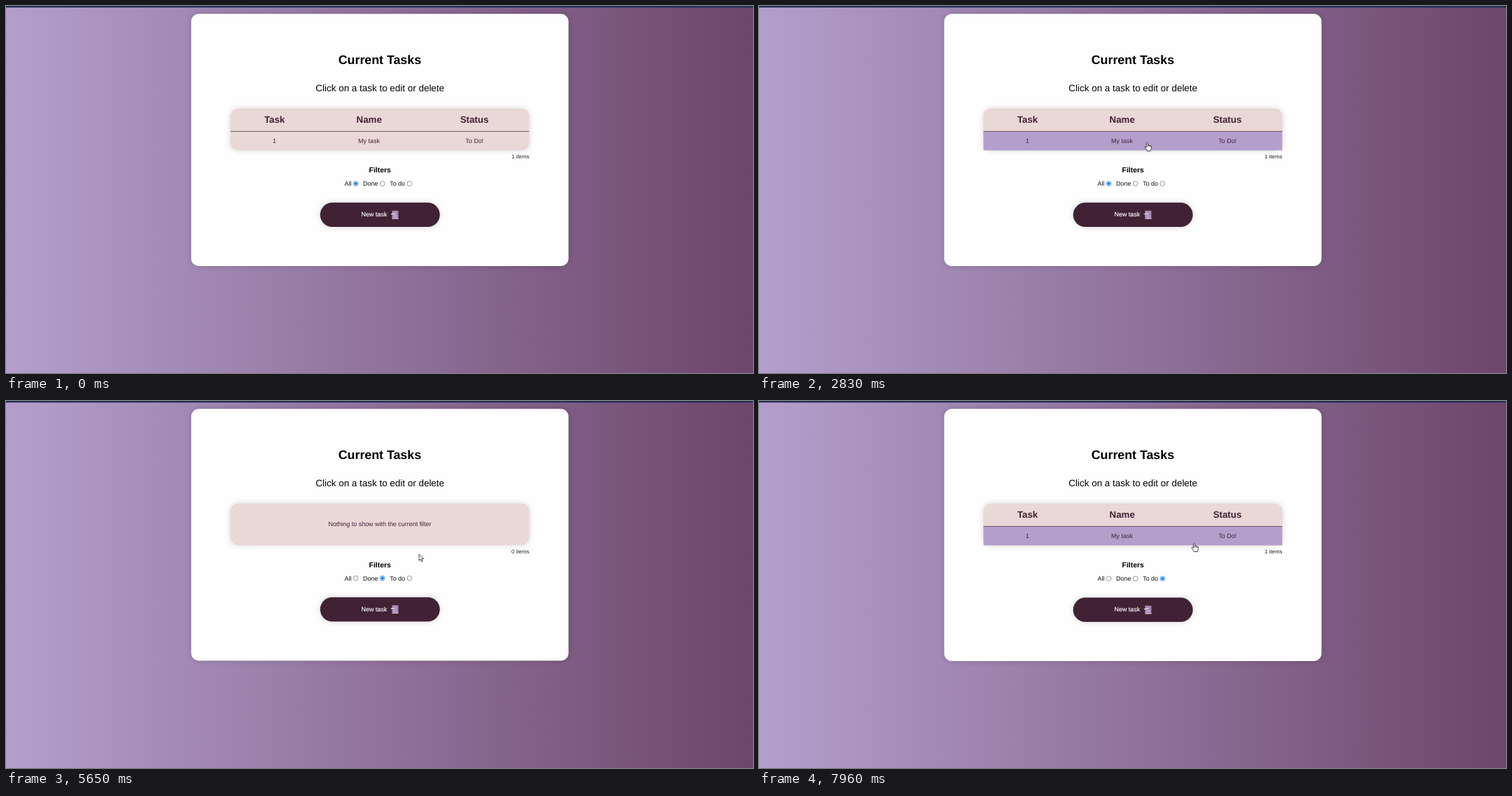
Animation of 1067 by 525 pixels, one loop 8 s. Source, as an HTML page:

```html
<!DOCTYPE html>
<html lang="en">
<head>
<meta charset="utf-8">
<title>Current Tasks</title>
<style>
  html, body { margin: 0; width: 100%; height: 100%; overflow: hidden; background: #6d466b; }
  svg { display: block; width: 1067px; height: 525px; }
  text {
    font: 8.95px "Liberation Sans", Arial, sans-serif; fill: #412234;
    text-anchor: middle; text-rendering: geometricPrecision;
  }
  .title { font-size: 17.8px; font-weight: bold; fill: #000; }
  .lead { font-size: 13.45px; fill: #000; }
  .head { font-size: 13.34px; font-weight: bold; }
  .count { font-size: 7.85px; text-anchor: end; fill: #222; }
  .filters { font-size: 10.4px; font-weight: bold; fill: #000; }
  .label { text-anchor: start; fill: #111; }
  .button { text-anchor: start; fill: #fff; stroke: #fff; stroke-width: .15; }
  .shadow { opacity: .16; filter: url(#blur); }
</style>
</head>
<body>
<svg viewBox="0 0 1067 525">
  <defs>
    <linearGradient id="page">
      <stop offset="0" stop-color="#b49fcc"/>
      <stop offset="1" stop-color="#6d466b"/>
    </linearGradient>
    <filter id="blur" x="-20%" y="-60%" width="140%" height="220%">
      <feGaussianBlur stdDeviation="4.5"/>
    </filter>
  </defs>
  <rect width="1067" height="525" fill="url(#page)"/>
  <rect width="1067" height="2.2" fill="#1f2d56"/>

  <rect class="card shadow" x="264.5" y="11.3" width="539" rx="11.1"/>
  <rect class="card" x="264.5" y="11.3" width="539" rx="11.1" fill="#fefefe"/>
  <text class="title" x="533.9" y="83.3">Current Tasks</text>
  <text class="lead" x="534.2" y="121.6">Click on a task to edit or delete</text>

  <rect class="table shadow" x="320.6" y="146.8" width="426.8" rx="11.1"/>
  <rect class="table" x="320.6" y="146.8" width="426.8" rx="11.1" fill="#ead7d7"/>
  <g id="tasks">
    <rect id="row" x="320.6" y="179.5" width="426.8" height="27" fill="#b49fcc"/>
    <path d="M320.6 179.4H747.4" stroke="#412234" stroke-width=".7"/>
    <text class="head" x="383.6" y="167.3">Task</text>
    <text class="head" x="518.7" y="167.3">Name</text>
    <text class="head" x="669" y="167.3">Status</text>
    <text x="383.4" y="195.8">1</text>
    <text x="518.5" y="195.8">My task</text>
    <text x="669.2" y="195.8">To Do!</text>
  </g>
  <text id="empty" x="534" y="179">Nothing to show with the current filter</text>

  <g id="lower">
    <text id="count" class="count" x="747.4" y="218.3"></text>
    <text class="filters" x="534.2" y="238.4">Filters</text>
    <text class="label" x="483.6" y="257.4">All</text>
    <text class="label" x="510" y="257.4">Done</text>
    <text class="label" x="548.2" y="257.4">To do</text>
    <g id="radios"></g>
    <rect class="shadow" x="448.7" y="281.3" width="171" height="34.8" rx="17.4"/>
    <rect x="448.7" y="281.3" width="171" height="34.8" rx="17.4" fill="#412234"/>
    <text class="button" x="507.5" y="301.4">New task</text>
    <rect x="551.4" y="292.8" width="9" height="12" fill="#a78bb8"/>
    <path d="M552 303.9H560.4M553 300.5H558.5" stroke="#d9cbe2" stroke-width=".9"/>
    <path d="M549.6 297.7L556.3 296.9" stroke="#f1e6ee" stroke-width="1.1"/>
  </g>

  <g id="cursor" stroke="#1c1722" stroke-width=".8" stroke-linejoin="round" fill="#fff">
    <path id="arrow" d="M.3 .3V9.3L2.4 7.4L3.8 10.8L5.4 10.1L4 6.8H6.8Z"/>
    <path id="hand" d="M-1 1Q0 -.6 1 1V4.4Q2 3.6 2.8 4.8Q3.8 4 4.4 5.2Q5.7 4.7 5.8 6.2V9Q5.6 10.6 4.8 11.4V12.6H-.3V11.4Q-1.7 9.9-3.3 7.6Q-3.6 6.2-2.3 6.3L-1 7.6ZM1 4.4V6.5M2.8 4.8V6.6M4.4 5.2V6.8"/>
  </g>
</svg>
<script>
const LOOP = 8000, FADE = 300, PICK_DONE = 3940, PICK_TODO = 6350;
const $ = id => document.getElementById(id);
const clamp = k => Math.min(1, Math.max(0, k));

// Pointer stops: arrival time, x, y and an optional pause in ms.
const stops = [
  [150, 1064, 518], [820, 858, 287], [1300, 835, 314.5, 190],
  [1760, 755, 172], [2000, 384, 152], [2330, 577.5, 187],
  [3050, 548, 197, 90], [3330, 517, 244], [3800, 537, 252, 400],
  [4590, 645.5, 233], [4720, 590, 187], [4950, 597, 204.5, 430],
  [6120, 573, 252, 500], [7420, 612.5, 188], [7960, 621.5, 203]
];

const radios = [499.6, 537.6, 576.4].map(x => {
  const g = document.createElementNS("http://www.w3.org/2000/svg", "g");
  g.innerHTML = `<circle cx="${x}" cy="254.1" r="3.4" fill="#fff" stroke-width=".75"/>
    <circle cx="${x}" cy="254.1" r="2.15" fill="#0b7bf0"/>`;
  $("radios").append(g);
  return g.children;
});

function pointerAt(t) {
  const i = stops.findLastIndex(stop => stop[0] <= t);
  if (i < 0) return null;
  const [t0, x0, y0, pause = 0] = stops[i];
  const [t1, x1, y1] = stops[i + 1] || [LOOP, x0, y0];
  const k = clamp((t - t0 - pause) / (t1 - t0 - pause));
  const eased = k * k * (3 - 2 * k);
  return [x0 + (x1 - x0) * eased, y0 + (y1 - y0) * eased];
}

const fade = (t, start) => 1 - (1 - clamp((t - start) / FADE)) ** 2.2;
const hoverAt = t => fade(t, 2296) - fade(t, 3185) + fade(t, 7000);

const show = (el, on) => el.setAttribute("visibility", on ? "visible" : "hidden");

function setHeights(selector, height) {
  document.querySelectorAll(selector).forEach(el => el.setAttribute("height", height));
}

function render(t) {
  const choice = t < PICK_DONE ? 0 : t < PICK_TODO ? 1 : 2;
  const empty = choice === 1;
  const shift = empty ? -0.6 : 0;
  show($("tasks"), !empty);
  show($("empty"), empty);
  $("row").setAttribute("opacity", hoverAt(t));
  $("count").textContent = empty ? "0 items" : "1 items";
  $("lower").setAttribute("transform", `translate(0 ${shift})`);
  setHeights(".card", 360.8 + shift);
  setHeights(".table", 59.7 + shift);
  radios.forEach(([ring, dot], i) => {
    ring.setAttribute("stroke", i === choice ? "#0b7bf0" : "#767076");
    show(dot, i === choice);
  });

  const point = pointerAt(t);
  const overRow = !!point && !empty && point[0] < 747.4 && point[1] > 179.5 && point[1] < 206.5;
  show($("arrow"), point && !overRow);
  show($("hand"), overRow);
  if (point) $("cursor").setAttribute("transform", `translate(${point})`);
}

const start = performance.now();
function tick() {
  render((performance.now() - start) % LOOP);
  requestAnimationFrame(tick);
}
tick();
</script>
</body>
</html>
```
